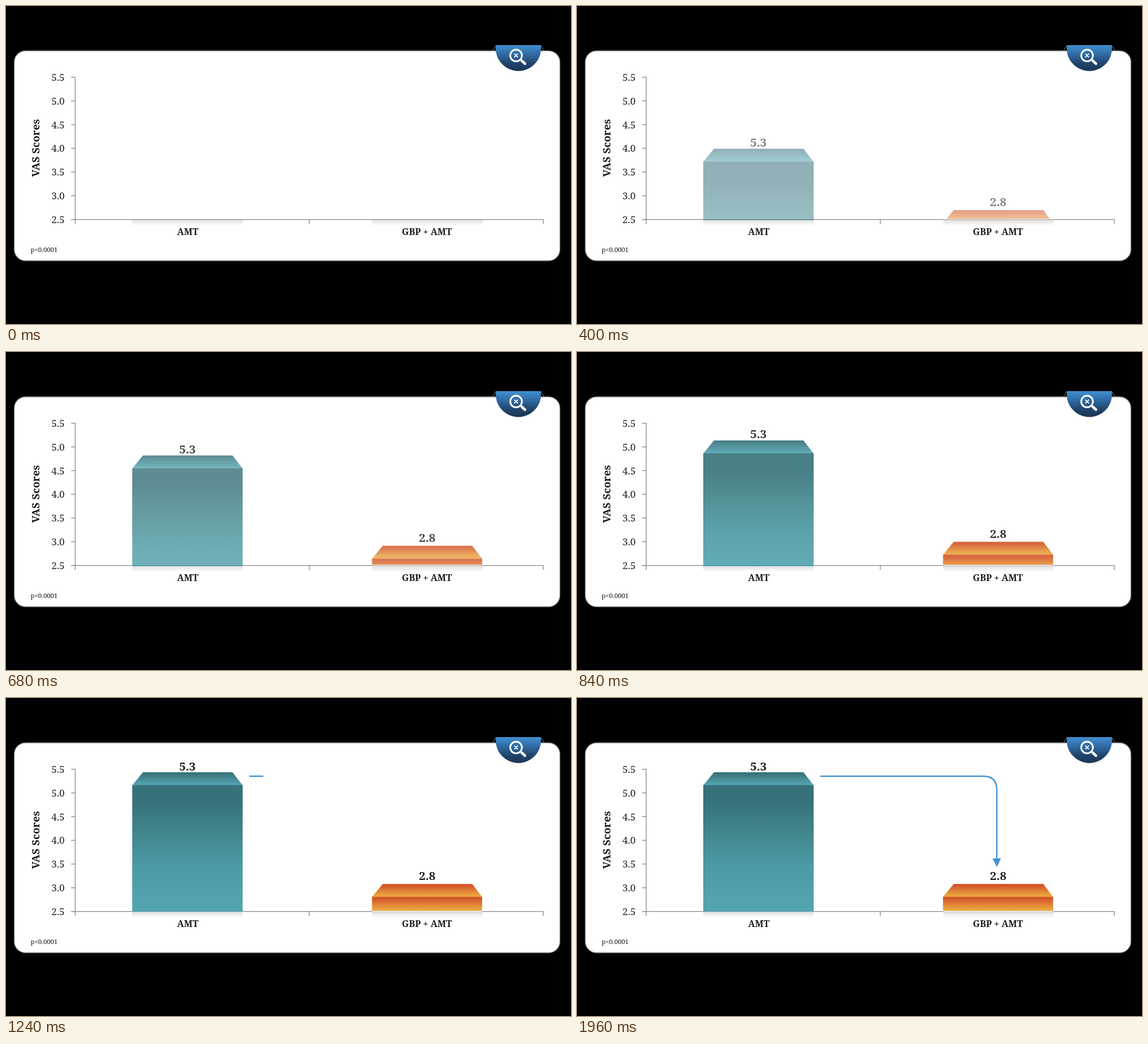
These frames come from a looping animation (998 by 561 pixels, 8000 ms). An HTML page:

```html
<!DOCTYPE html>
<html lang="en">
<head>
<meta charset="utf-8">
<title>VAS Scores</title>
<style>
  html, body { margin: 0; width: 100%; height: 100%; overflow: hidden; background: #000; }
  svg { display: block; width: 998px; height: 561px; }
  text { font-family: "Noto Serif", Cambria, serif; fill: #1c1a1b; }
  .mid { text-anchor: middle; font-weight: 700; }
  .name { font-size: 16px; }
  .value { font-size: 20.5px; }
  .tick { font-size: 17px; text-anchor: end; }
  .axis { stroke: #868686; stroke-width: 1.3; fill: none; }
</style>
</head>
<body>
<svg viewBox="0 0 998 561">
  <defs>
    <linearGradient id="tealTop" x2="0" y2="1">
      <stop offset=".08" stop-color="#37727b"/><stop offset=".9" stop-color="#51a2ae"/>
    </linearGradient>
    <linearGradient id="tealFront" x2="0" y2="1">
      <stop offset=".13" stop-color="#37727b"/><stop offset=".4" stop-color="#43888f"/>
      <stop offset=".62" stop-color="#4b99a4"/><stop offset=".9" stop-color="#52a3af"/>
    </linearGradient>
    <linearGradient id="orange" x2="0" y2="1">
      <stop offset=".15" stop-color="#d4582c"/><stop offset=".85" stop-color="#eaa23d"/>
    </linearGradient>
    <linearGradient id="shade" x2="0" y2="1">
      <stop offset="0" stop-color="#dfdfdf"/><stop offset="1" stop-color="#fff"/>
    </linearGradient>
    <linearGradient id="navy" x2="0" y2="1">
      <stop offset="0" stop-color="#4090d2"/><stop offset=".35" stop-color="#306ba4"/>
      <stop offset=".72" stop-color="#20436a"/><stop offset="1" stop-color="#1b3454"/>
    </linearGradient>
    <clipPath id="clipA"><rect id="floorA" x="200" y="90" width="240" height="288"/></clipPath>
    <clipPath id="clipB"><rect x="630" y="90" width="230" height="285.5"/></clipPath>
    <mask id="reveal" maskUnits="userSpaceOnUse" x="0" y="0" width="998" height="561">
      <path id="wipe" d="M429.5 138H718Q741.5 138 741.5 162V298" fill="none" stroke="#fff" stroke-width="20"/>
    </mask>
  </defs>

  <rect x="14.5" y="79" width="964" height="370.5" rx="20" fill="#fff" stroke="#777" stroke-width="1.3"/>

  <path d="M859.5 79L865.5 69.5H944.5L950.5 79Z" fill="#000" stroke="#aaa" stroke-width=".8"/>
  <path d="M865.4 69H944.6A40 40 0 1 1 865.4 69Z" fill="url(#navy)"/>
  <g fill="none" stroke="#fff" stroke-linecap="round">
    <circle cx="901" cy="87.3" r="10.3" stroke-width="3"/>
    <path d="M898.3 84.6l5.4 5.4m0-5.4l-5.4 5.4" stroke-width="1.8"/>
    <path d="M909 94.5l2 2" stroke-width="3"/>
    <path d="M911.5 97l5.2 4.8" stroke-width="4.6"/>
  </g>

  <rect x="223" y="377" width="195" height="11" fill="url(#shade)"/>
  <rect x="647" y="377" width="195" height="11" fill="url(#shade)"/>
  <g id="axes">
    <path class="axis" d="M122.2 125V384.5M115 376.6H949.5M535.7 376.6V384.5M949 376.6V384.5"/>
  </g>
  <text class="mid name" x="321" y="403.5">AMT</text>
  <text class="mid name" x="743.5" y="403.5">GBP + AMT</text>
  <text class="mid" font-size="18.5" transform="translate(59 250.5) rotate(-90)">VAS Scores</text>
  <text x="43.5" y="433.5" font-size="11.3">p&lt;0.0001</text>

  <g clip-path="url(#clipA)">
    <g id="barA">
      <path d="M242 131H400L418 154H223Z" fill="url(#tealTop)"/>
      <rect x="223" y="153.7" width="195" height="224.3" fill="url(#tealFront)"/>
      <text class="mid value" x="320.5" y="127.5">5.3</text>
    </g>
  </g>
  <path id="gap" d="M647 376.3H841" stroke="#eee" stroke-width="1.6"/>
  <g clip-path="url(#clipB)">
    <g id="barB">
      <path d="M665.5 328H823.5L841 351H646.5Z" fill="url(#orange)"/>
      <rect x="646.5" y="350.8" width="194.5" height="25" fill="url(#orange)"/>
      <text class="mid value" x="744" y="321">2.8</text>
    </g>
  </g>

  <g mask="url(#reveal)">
    <path d="M429.5 138H718Q741.5 138 741.5 162V285" fill="none" stroke="#4092d4" stroke-width="2.4"/>
    <path d="M734 283H749L741.5 298Z" fill="#4092d4"/>
  </g>
</svg>
<script>
const LOOP = 8000, STEP = 40;
const $ = id => document.getElementById(id);
const ns = "http://www.w3.org/2000/svg";

function add(tag, attrs, text = "") {
  const el = document.createElementNS(ns, tag);
  for (const key in attrs) el.setAttribute(key, attrs[key]);
  el.textContent = text;
  $("axes").append(el);
}

for (let i = 0; i < 7; i++) {
  const y = 125.6 + i * 41.83;
  add("path", { class: "axis", d: `M115 ${y}H122` });
  add("text", { class: "tick", x: 103.5, y: y + 6.4 }, (5.5 - i / 2).toFixed(1));
}

// Quadratic ease-out progress of a move
function ease(t, start, length) {
  const u = Math.min(1, Math.max(0, (t - start) / length));
  return 1 - (1 - u) ** 2;
}

function rise(id, travel, p) {
  $(id).setAttribute("transform", `translate(0 ${travel * (1 - p)})`);
  $(id).setAttribute("opacity", p);
}

const wipe = $("wipe"), pathLength = wipe.getTotalLength();

function draw(t) {
  const p = ease(t, 7, 1200);
  rise("barA", 267, p);
  rise("barB", 71, p);
  $("gap").setAttribute("opacity", p);
  $("floorA").setAttribute("height", p < 1 ? 288 : 287);

  const q = t >= 1960 ? 1 : ease(t, 1218, 805);
  wipe.style.display = q ? "" : "none";
  wipe.setAttribute("stroke-dasharray", `${pathLength * q} ${pathLength + 10}`);
}

const begin = performance.now();
function tick() {
  const t = (performance.now() - begin) % LOOP;
  draw(Math.floor(t / STEP) * STEP);
  requestAnimationFrame(tick);
}
draw(0);
requestAnimationFrame(tick);
</script>
</body>
</html>
```
